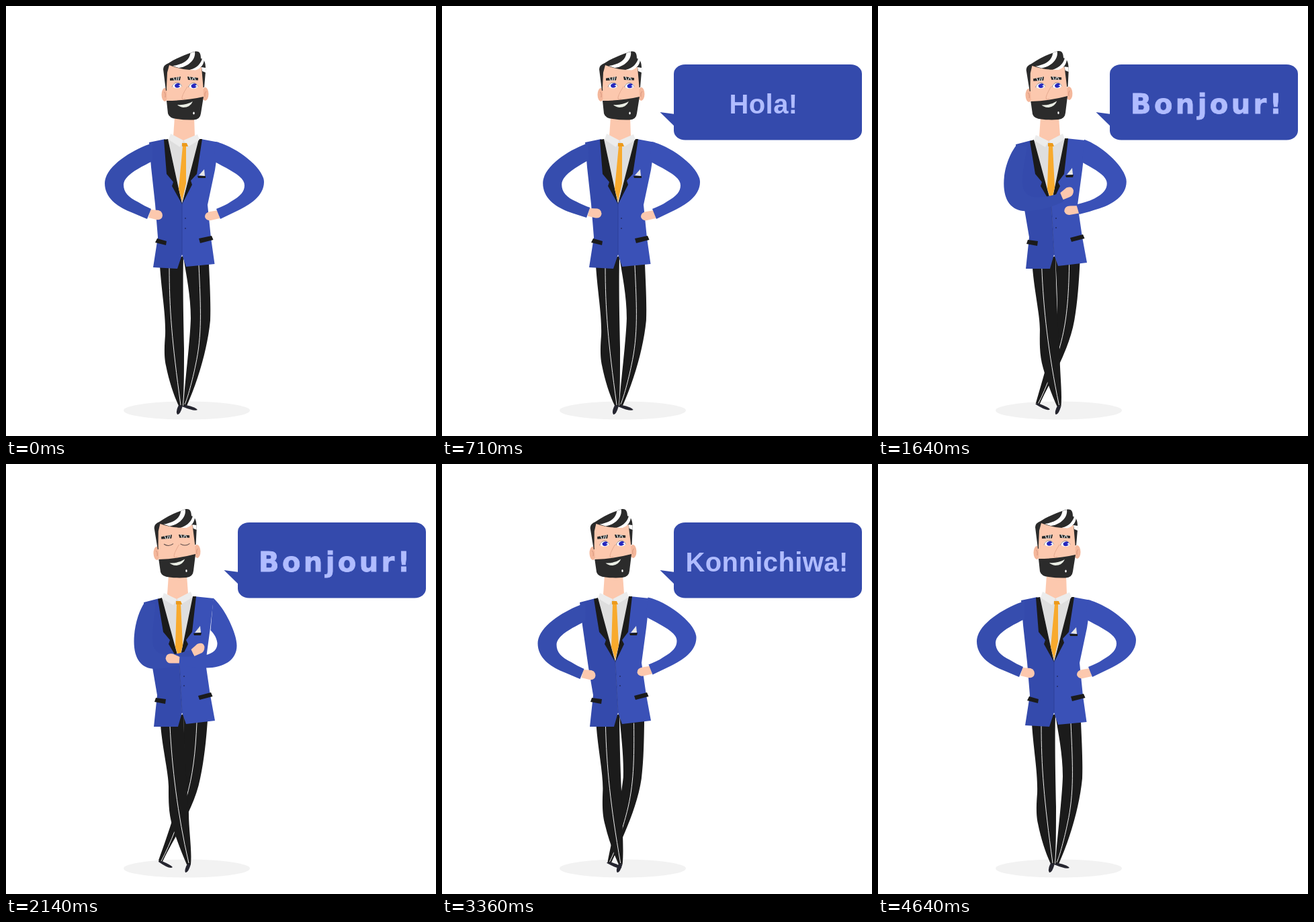
An HTML page for the animation above (5 s loop, 640 by 640 pixels).

```html
<!DOCTYPE html>
<html lang="en">
<head>
<meta charset="utf-8">
<title>Greetings</title>
<style>
  html, body { margin: 0; width: 100%; height: 100%; overflow: hidden; background: #fff; }
  svg { display: block; width: 100vw; height: 100vh; }
  #word { fill: #b0bcff; stroke: #b0bcff; stroke-width: 0; font: 40px "Liberation Sans", Arial, sans-serif; letter-spacing: .4px; }
</style>
</head>
<body>
<svg viewBox="0 0 640 640">
  <ellipse cx="269" cy="602" rx="94" ry="13.5" fill="#f2f2f2"/>
  <g id="legs"></g>
  <g id="torso"></g>
  <g id="leftArm"></g>
  <g id="rightArm"></g>
  <g id="head">
    <ellipse cx="236.500" cy="132" rx="5" ry="10" fill="#f4b79b"/>
    <ellipse cx="296.500" cy="131" rx="5" ry="10" fill="#f4b79b"/>
    <path d="M235 128Q238 129 237 136M298 127Q295 129 296 135" fill="none" stroke="#cf8f78" stroke-width=".8"/>
    <path fill="#2b2b2b" d="M238 126L234 94Q234 88 242 85C253 78 265 73 277 69C285 66 290 67 290 78Q298 79 297 98L295 121L290 122L240 126Z"/>
    <path fill="#fcc8ae" d="M239.500 143L239 121L240 99L243 88Q258 94 273 95L291 91L293.500 120L294 138Z"/>
    <path fill="#fff" d="M248 89C262 87 273 82 274.500 70L281 68C283 80 270 91 257 92Z"/>
    <path fill="#fff" d="M274 95C284 92 290 86 292 78L295 80C294 88 290 93 282 95.500ZM291 91L297 92L297 99L292 97Z"/>
    <path fill="none" stroke="#e3a78e" stroke-width=".9" d="M270 120Q261 134 262 138Q264 140 267 138"/>
    <path fill="#2b2b2b" d="M239 141Q268 141 294 135L290 160Q289 169 279 169.500Q266 170 254 168Q243 167 241 160Z"/>
    <path fill="#e9ede4" d="M255 147Q268 148 278 142Q274 151 264 151Q258 150 255 147Z"/>
    <ellipse cx="279.500" cy="159.500" rx="1.200" ry="2" fill="#fff"/>
    <g id="eyes"></g>
    <g id="brows">
      <path fill="#2b2b2b" d="M244 107.500L260 105L259 110.500L244 111ZM270 105L286 107L286 110.500L271 110Z"/>
      <path stroke="#dfe6e6" stroke-width="1.200" fill="none" d="M249 106.500L251 111M254.500 106L253 111M257.500 105L256 111M273 105L275 110M279 106L277 110M280 106L282 110.500"/>
    </g>
  </g>
  <g id="bubble">
    <path fill="#344aac" d="M324.500 158L347 161L347 180Z"/>
    <rect x="345" y="87" width="280" height="112.500" rx="17" ry="14" fill="#344aac"/>
    <text id="word" y="160"></text>
  </g>
</svg>
<script>
const NS = 'http://www.w3.org/2000/svg';
const $ = id => document.getElementById(id);
const LOOP = 5000, STEPS = 70;
const BLACK = '#1b1b1b', SKIN = '#fcc8ae', SHOE = '#25252f', BLUE_L = '#344aac', BLUE_R = '#3a51b7';

const parts = [];
function part(group, paint, standing, leaning, line) {
  const el = document.createElementNS(NS, 'path');
  el.setAttribute('fill', line ? 'none' : paint);
  if (line) {
    el.setAttribute('stroke', paint);
    el.setAttribute('stroke-width', line);
  }
  $(group).append(el);
  parts.push({ el, group, standing, leaning: leaning.match(/-?[\d.]+/g).map(Number) });
}

// Legs: apart, then crossed
part('legs', BLACK,
  'M264 373C268 400 275 430 275 465C274 500 266 560 264 595L269 595C285 560 300 510 304 468C305 440 303 410 302 384Z',
  'M264 373C265 410 266 440 264 468C257 505 238 560 227 590L232 594C247 560 280 515 289 468C295 440 298 410 300 382Z');
part('legs', '#eee', 'M287 386C290 450 292 490 282 535C278 555 270 585 266 593',
  'M284 385C282 430 278 465 268 498C260 525 245 565 231 591', 1);
part('legs', SHOE, 'M262 595L268 594Q282 597 285 601Q281 604 262 596Z',
  'M227 591L232 591Q246 597 248 600Q244 604 227 592Z');
part('legs', BLACK,
  'M229 387C232 430 238 460 237 490C235 515 236 525 238 535C243 560 250 580 257 595L263 595C265 575 265 550 265 510C264 460 263 420 264 372Z',
  'M230 388C233 425 242 460 242 480C242 505 242 520 248 540C254 560 262 580 269 596L275 596C277 575 272 545 272 520C268 470 266 430 264 372Z');
part('legs', '#eee', 'M243 389C243 450 247 500 260 594', 'M244 390C247 450 255 520 272 594', 1);
part('legs', SHOE, 'M257 594Q252 604 255 608Q259 609 263 595Z', 'M270 595Q265 604 267 608Q271 609 275 596Z');

// Torso, back to front
part('torso', SKIN, 'M251 165L280 165L281 194L264 204L249 194Z', 'M242 165L269 165L271 193L255 204L240 194Z');
part('torso', '#dedede', 'M241 198L264 201L288 198L262 294Z', 'M231 200L255 202L279 198L258 294Z');
part('torso', BLUE_L, 'M213 203L237 198L262 294L262 370L255 391L219 389L226 344L222 295L216 240Z',
  'M205 206L228 200L258 294L262 370L256 391L220 391L225 344L218 303L209 240Z');
part('torso', BLUE_R, 'M262 294L290 198L317 203L311 244L300 296L305 345L310.500 384L268 388L262 370Z',
  'M258 294L280 197L309 200L304 244L297 296L304 344L311 382L268 387L262 370Z');
part('torso', '#2b3d92', 'M262 294L262 370', 'M258 294L262 370', .8);
part('torso', BLACK, 'M235 199L241 198L262 295L247 268L249 262L239 250Z', 'M226 201L232 199L258 295L242 268L244 262L234 250Z');
part('torso', BLACK, 'M287 198L292 198L284 250L275 260L277 266L262 295Z', 'M278 197L283 197L277 250L268 262L271 268L258 295Z');
part('torso', '#f8aa2d', 'M263 208L268 208L268 264L262 291L257 272Z', 'M254 208L260 208L263 270L258 291L252 272Z');
part('torso', '#ececec', 'M245 190L264 200L259 210L242 199Z', 'M235 192L254 201L249 210L232 200Z');
part('torso', '#ececec', 'M285 191L288 199L272 209L264 200Z', 'M275 190L278 198L262 208L254 201Z');
part('torso', '#ec9a1c', 'M262 204L269 204L271 209L262 209Z', 'M253 204L260 204L262 209L253 209Z');
part('torso', '#e6e6e6', 'M287 252L295 243L296 253Z', 'M281 251L289 241L290 251Z');
part('torso', BLACK, 'M285 253L297 253L297 256L286 256Z', 'M279 252L291 251L290 255L280 255Z');
part('torso', BLACK, 'M225 346L239 350L238 356L222 352Z', 'M223 348L238 350L237 357L221 354Z');
part('torso', BLACK, 'M287 346L306 342L308.500 348L289 353Z', 'M286 345L305 340L307.500 346L288 351Z');
part('torso', '#29367a', 'M266 316L268 316M266 331L268 331', 'M264 316L266 316M264 330L266 330', 2);

// Arms: hands on hips, then folded
part('leftArm', SKIN, 'M215 303L227 304Q233 306 233 312Q232 319 224 318L212 315Z',
  'M279 274L289 265Q298 261 300 269Q300 277 294 279L285 283Z');
part('leftArm', '#364dae',
  'M218 204C190 213 147 238 147 264C147 285 165 298 184 306C193 310 201 313 210 317L216 302C210 299 203 296 197 292C182 285 175 277 175 266C175 252 200 240 218 231Z',
  'M211 203C203 214 195 237 195 261C195 287 206 302 227 302C246 301 267 296 286 286L280 273C268 278 255 281 244 281C230 281 223 273 223 261C222 242 226 222 227 205Z');
part('rightArm', SKIN, 'M316 304L304 306Q296 307 296 314Q298 320 305 319L318 316Z',
  'M265 291L254 286Q244 284 243 293Q245 301 252 300L264 300Z');
part('rightArm', BLUE_R,
  'M312 202C340 208 384 240 384 262C384 283 362 296 346 304C337 308 328 313 319 317L313 302C320 299 328 296 335 291C349 283 355 276 355 267C355 254 335 245 309 231Z',
  'M314 203C332 219 349 256 349 274C349 295 330 307 303 307C290 307 278 306 263 303L264 290C278 291 293 289 306 287C318 283 320 276 320 270C319 262 315 256 310 251Z');

const eye = (x, y) => `<ellipse cx="${x}" cy="${y}" rx="7" ry="4" fill="#fff"/>
  <path d="M${x - 3.5} ${y - 1}Q${x + 2} ${y - 6} ${x + 5} ${y - 1.5}L${x + 2} ${y}L${x + 5} ${y + 1}Q${x + 1} ${y + 5} ${x - 3} ${y + 2}Z" fill="#2527bd"/>
  <path d="M${x - 7.5} ${y + 2}Q${x - 5} ${y - 4.5} ${x} ${y - 4.5}Q${x + 5} ${y - 4.5} ${x + 7} ${y + 1}" fill="none" stroke="#6d6d78" stroke-width=".7"/>`;
const lid = (x, y) => `<path d="M${x - 7} ${y}Q${x} ${y + 5} ${x + 7} ${y}" fill="none" stroke="#5b4a48"/>`;
const eyesOpen = eye(254.5, 118.5) + eye(279, 119);
const eyesShut = lid(254.5, 118.5) + lid(279, 119);

const words = [
  { from: 0, text: 'Hola!', x: 427.5, weight: 'bold' },
  { from: 11, text: 'Namaste!', x: 393 },
  { from: 21, text: 'Bonjour!', x: 376, weight: 'bold', family: '"DejaVu Sans", sans-serif', gap: 4.4, stroke: .8 },
  { from: 31, text: 'Nin Hao!', x: 405.5, slant: 'italic' },
  { from: 41, text: 'Konnichiwa!', x: 362.5, weight: 'bold' }
];

const ramp = (s, from, to) => Math.min(1, Math.max(0, (s - from) / (to - from)));
const lerp = (a, b, p) => a + (b - a) * p;

function blend(standing, leaning, p) {
  let i = 0;
  return standing.replace(/-?[\d.]+/g, n => lerp(+n, leaning[i++], p).toFixed(2));
}

function drawWord(s) {
  const w = words.filter(w => s >= w.from).pop(), el = $('word');
  el.textContent = w.text;
  el.setAttribute('x', w.x);
  el.style.fontWeight = w.weight || 'normal';
  el.style.fontStyle = w.slant || 'normal';
  el.style.fontFamily = w.family || '';
  el.style.letterSpacing = w.gap ? w.gap + 'px' : '';
  el.style.strokeWidth = w.stroke || 0;
}

function drawBubble(s) {
  const opening = s < 20;
  const size = opening ? ramp(s, 0, 5) : 1 - ramp(s, 51, 55);
  const turn = (opening ? -180 : -45) * (1 - size);
  const x = lerp(232, 485, size), y = lerp(166, 143.5, size);
  $('bubble').setAttribute('visibility', size ? 'visible' : 'hidden');
  $('bubble').setAttribute('transform', `translate(${x} ${y}) rotate(${turn}) scale(${size}) translate(-485 -143.5)`);
}

function draw(ms) {
  const s = Math.floor((ms % LOOP + 5) / (LOOP / STEPS)) % STEPS;
  const pose = {
    legs: ramp(s, 9, 25) ** 1.8 - ramp(s, 40, 50) ** 1.8,
    torso: ramp(s, 12, 20) - ramp(s, 47, 50),
    leftArm: ramp(s, 9, 24) - ramp(s, 40, 47),
    rightArm: ramp(s, 21, 25) ** 2 - ramp(s, 40, 46)
  };
  for (const { el, group, standing, leaning } of parts)
    el.setAttribute('d', blend(standing, leaning, pose[group]));

  const lean = pose.torso;
  $('leftArm').setAttribute('transform', `translate(${-4.5 * lean} ${3 * lean})`);
  $('rightArm').setAttribute('transform', `translate(${-5.5 * lean} ${-3.5 * lean})`);
  $('head').setAttribute('transform', `translate(${-10.8 * lean} 0) rotate(${-2.1 * lean} 266 165)`);
  $('eyes').innerHTML = s === 30 ? eyesShut : eyesOpen;

  const lift = Math.max(0, 3 - 1.5 * Math.abs(s - 63), 2 - Math.abs(s - 42));
  $('brows').setAttribute('transform', `translate(0 ${-lift})`);
  drawWord(s);
  drawBubble(s);
}

const start = performance.now();
function tick() {
  draw(performance.now() - start);
  requestAnimationFrame(tick);
}
tick();
</script>
</body>
</html>
```
